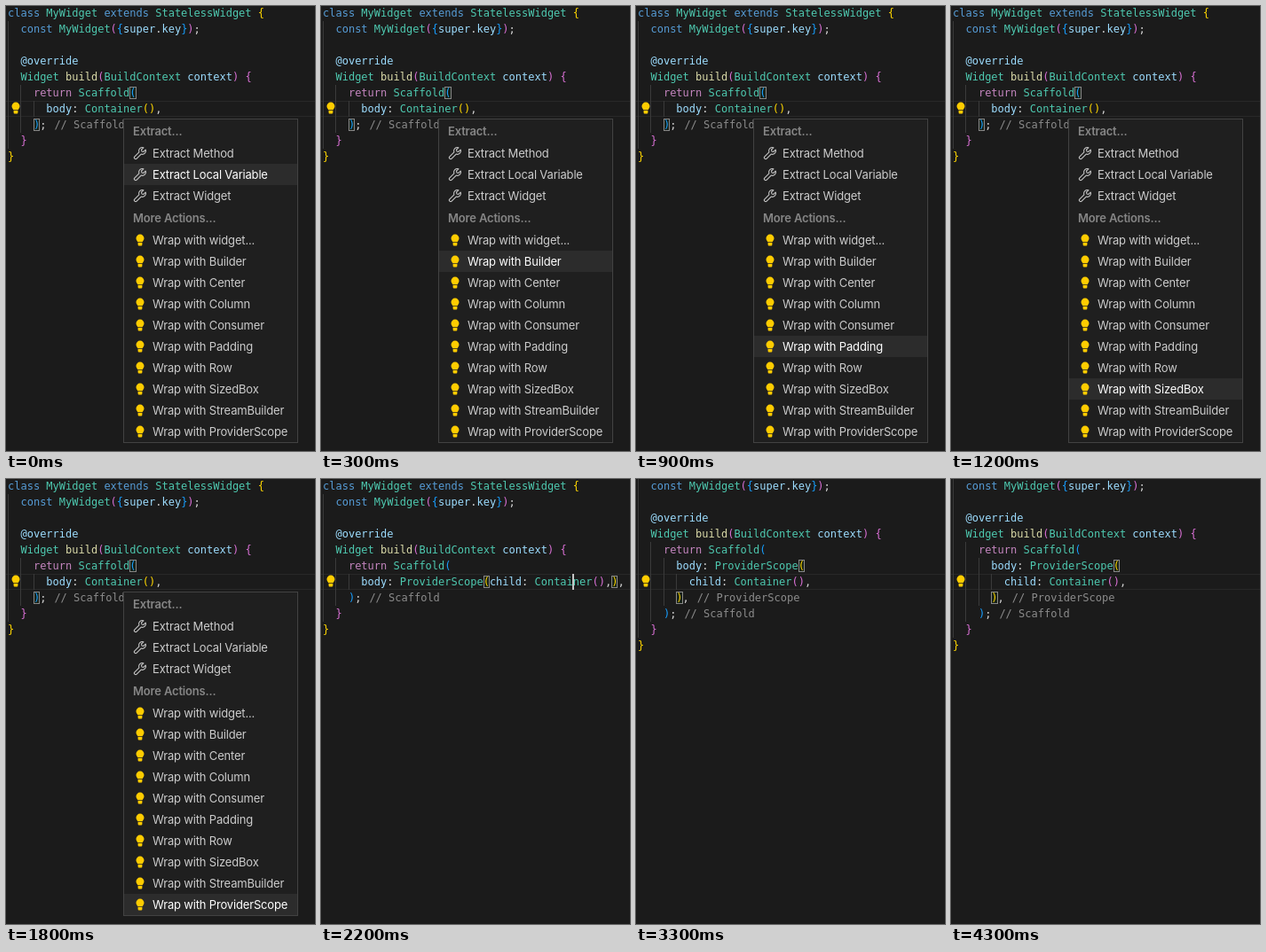
Write an HTML page that moves like this. It is 348 by 502 pixels and loops after 4400 ms.

```html
<!DOCTYPE html>
<html lang="en">
<head>
<meta charset="utf-8">
<title>Wrap with ProviderScope</title>
<style>
html, body { margin: 0; width: 100%; height: 100%; overflow: hidden; background: #1b1b1b; }
#stage { position: absolute; left: 0; top: 0; width: 348px; height: 502px; overflow: hidden; background: #1b1b1b; }
.code { position: absolute; inset: 0; font: 12px/18px "DejaVu Sans Mono", monospace; color: #d4d4d4; }
.line { position: absolute; left: 2px; height: 18px; white-space: pre; }
.guide { position: absolute; width: 1px; height: 18px; background: #3a3a3a; }
.keyword { color: #569cd6; }
.control { color: #c586c0; }
.type { color: #4ec9b0; }
.method { color: #dcdcaa; }
.name { color: #9cdcfe; }
.label { color: #8c8c8c; margin-left: 9px; }
.b0 { color: #ffd700; }
.b1 { color: #da70d6; }
.b2 { color: #179fff; }
.match { outline: 1px solid #888; outline-offset: -1px; background: rgba(0, 100, 0, .1); }
#current { position: absolute; left: 0; top: 107px; width: 348px; height: 18px; box-sizing: border-box; border: solid #282828; border-width: 1px 0; }
#caret { position: absolute; top: 107px; width: 2px; height: 18px; background: #c4c4c4; }
#bulb { position: absolute; left: 3px; top: 107px; }
svg { display: block; width: 16px; height: 16px; }
#menu { position: absolute; left: 132px; top: 127px; width: 195px; height: 364px; background: #1f1f1f; border: 1px solid #424242; font: 13px/24px Inter, "Open Sans", sans-serif; letter-spacing: -.17px; color: #ccc; }
.head { height: 26px; line-height: 26px; padding-left: 10px; font-weight: 600; color: #868686; }
.row { position: relative; height: 24px; padding-left: 32px; white-space: pre; }
.row svg { position: absolute; left: 10px; top: 4px; }
.row.on { background: #2c2c2c; color: #fff; }
</style>
</head>
<body>
<div id="stage">
  <div id="current"></div>
  <div id="scenes"></div>
  <div id="caret"></div>
  <div id="bulb"></div>
  <div id="menu"></div>
</div>
<script>
const LOOP = 4400, INSERT = 2000, FORMAT = 2700, BLINK = 500;
const CHAR = 7.224, LEFT = 2, LINE = 18;
const $ = id => document.getElementById(id);

const bulb = `<svg viewBox="0 0 16 16"><path fill="#fc0" d="M8 1.6a4.5 4.5 0 0 0-4.5 4.5c0 1.9 1.2 2.7 1.9 4.2h5.2c.7-1.5 1.9-2.3 1.9-4.2A4.5 4.5 0 0 0 8 1.6zM5.6 11.1h4.8v2.2q0 1.2-1.2 1.2H6.8q-1.2 0-1.2-1.2z"/></svg>`;
const wrench = `<svg viewBox="0 0 16 16"><path fill="none" stroke="#c5c5c5" stroke-width="1.1" stroke-linejoin="round" d="M11.9 1.8a3.9 3.9 0 0 0-5 5L1.9 11.8a1.6 1.6 0 0 0 2.3 2.3l5-5a3.9 3.9 0 0 0 5-5l-2.3 2.3-2-.4-.4-2z"/></svg>`;

// A caret before a bracket marks it as the highlighted pair.
const head = ["class MyWidget extends StatelessWidget {", "  const MyWidget({super.key});", "",
  "  @override", "  Widget build(BuildContext context) {"];
const tail = ["  }", "}"];
const listings = [
  [...head, "    return Scaffold^(", "      body: Container(),", "    ^); // Scaffold", ...tail],
  [...head, "    return Scaffold(", "      body: ProviderScope^(child: Container(),^),", "    ); // Scaffold", ...tail],
  [...head.slice(1), "    return Scaffold(", "      body: ProviderScope^(", "        child: Container(),",
    "      ^), // ProviderScope", "    ); // Scaffold", ...tail]
];

function wordClass(word) {
  if (/^(class|extends|const)$/.test(word)) return "keyword";
  if (word === "return") return "control";
  if (word === "build") return "method";
  return /^[A-Z]/.test(word) ? "type" : "name";
}

function paint(lines, firstDepth) {
  let depth = firstDepth;
  const colour = token => {
    if (token.startsWith(" //")) return `<span class="label">${token.slice(1)}</span>`;
    if (/[\w@]/.test(token)) return `<span class="${wordClass(token)}">${token}</span>`;
    const mark = token[0] === "^" ? " match" : "";
    const bracket = token.slice(-1);
    const level = "({".includes(bracket) ? depth++ : --depth;
    return `<span class="b${level % 3}${mark}">${bracket}</span>`;
  };
  const indent = i => lines[i] ? lines[i].search(/\S/) : indent(i + 1);
  return lines.map((text, i) => {
    const top = i * LINE - 1;
    let html = "";
    for (let col = 0; col < indent(i); col += 2)
      html += `<div class="guide" style="left:${Math.round(LEFT + col * CHAR)}px;top:${top}px"></div>`;
    const tokens = text.replace(/ \/\/.*|@?\w+|\^?[(){}]/g, colour);
    return html + `<div class="line" style="top:${top}px">${tokens}</div>`;
  }).join("");
}

$("scenes").innerHTML = listings.map((lines, i) =>
  `<div class="code">${paint(lines, i === 2 ? 1 : 0)}</div>`).join("");
$("bulb").innerHTML = bulb;

const row = (icon, text) => `<div class="row">${icon}<span>${text}</span></div>`;
const extracts = ["Method", "Local Variable", "Widget"];
const wraps = ["widget...", "Builder", "Center", "Column", "Consumer", "Padding", "Row",
  "SizedBox", "StreamBuilder", "ProviderScope"];
$("menu").innerHTML =
  `<div class="head">Extract...</div>` + extracts.map(s => row(wrench, "Extract " + s)).join("") +
  `<div class="head">More Actions...</div>` + wraps.map(s => row(bulb, "Wrap with " + s)).join("");

const scenes = [...document.querySelectorAll(".code")];
const rows = [...document.querySelectorAll(".row")];
const presses = [100, 200, 300, 500, 600, 700, 900, 1000, 1200, 1300, 1500];
const show = (el, on) => { el.style.visibility = on ? "visible" : "hidden"; };

function render(t) {
  const stage = t < INSERT ? 0 : t < FORMAT ? 1 : 2;
  scenes.forEach((el, i) => show(el, i === stage));
  show($("menu"), stage === 0);
  const selected = 1 + presses.filter(p => p <= t).length;
  rows.forEach((el, i) => el.classList.toggle("on", i === selected));

  const since = t - (stage === 2 ? FORMAT : INSERT);
  show($("caret"), stage > 0 && Math.floor(since / BLINK) % 2 === 0);
  $("caret").style.left = Math.round(LEFT + (stage === 2 ? 21 : 39) * CHAR - 1) + "px";
}

const start = performance.now();
function tick() {
  render((performance.now() - start) % LOOP);
  requestAnimationFrame(tick);
}
tick();
</script>
</body>
</html>
```
